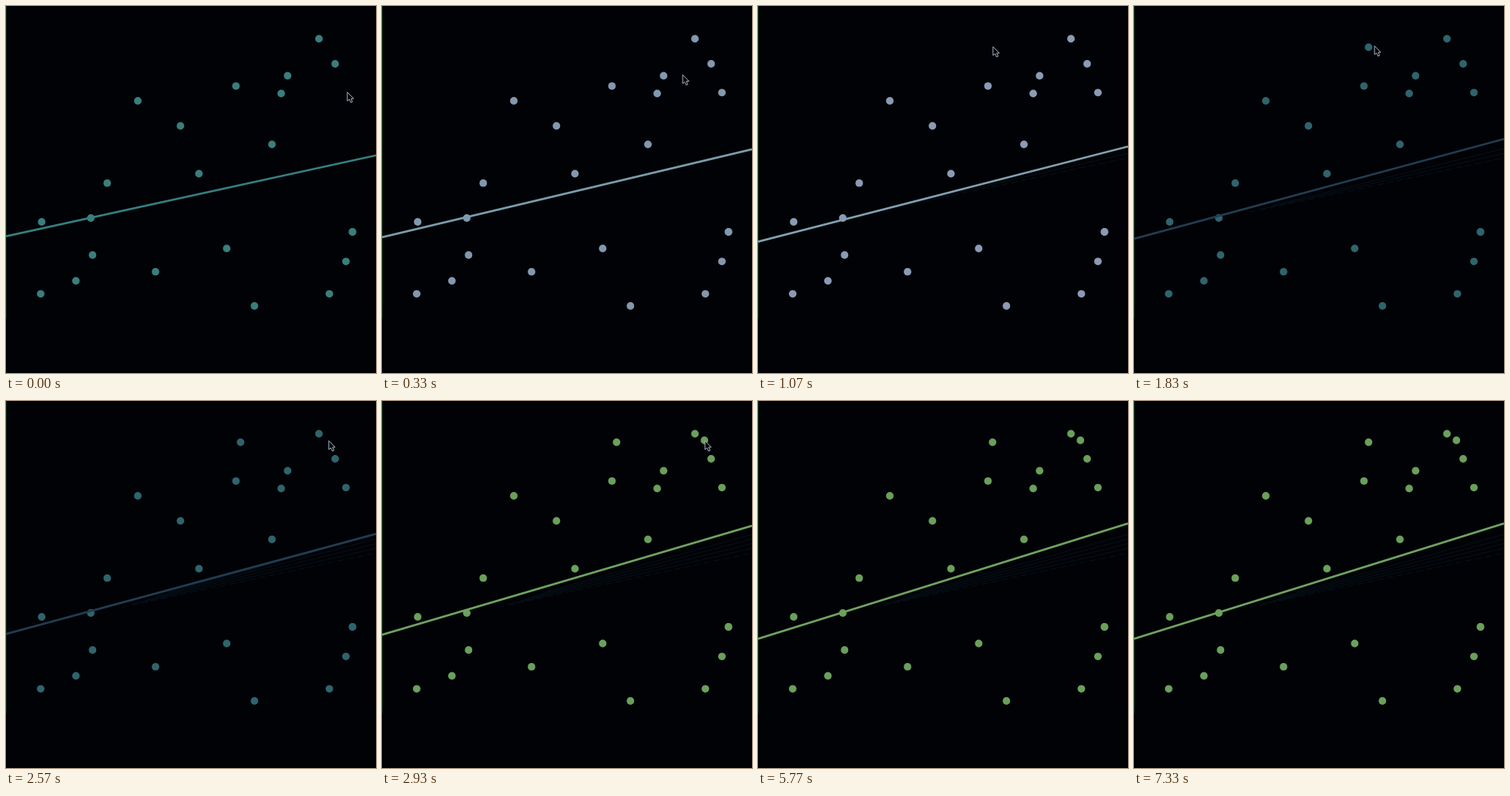
Write an HTML page that moves like this. It is 480 px wide and 476 px high and loops after 7410 ms.

```html
<!DOCTYPE html>
<html lang="en">
<head>
<meta charset="utf-8">
<title>Line fitting</title>
<style>
  html, body { margin: 0; width: 100%; height: 100%; overflow: hidden; background: #010206; }
  svg { display: block; width: 100vw; height: 100vh; }
</style>
</head>
<body>
<svg viewBox="0 0 480 476">
  <rect width="480" height="476" fill="#010206"/>
  <rect width="1" height="405" fill="#08260f"/>
  <g id="trails" stroke="#04121a"></g>
  <g id="dots"></g>
  <line id="fit" x1="0" x2="480" stroke-width="2.7"/>
  <path id="cursor" d="M0 0V11.4L2.6 9.2L4.6 13.4L6.6 12.5L4.8 8.4H8.2Z"
        fill="#010206" stroke="#a9b6c6"/>
</svg>
<script>
const LOOP = 7410, WIDTH = 480, STEP = 24, RATE = 0.5;
const $ = id => document.getElementById(id);

function set(el, attrs) {
  for (const k in attrs) el.setAttribute(k, attrs[k]);
  return el;
}
const add = (parent, tag, attrs) =>
  set(parent.appendChild(document.createElementNS('http://www.w3.org/2000/svg', tag)), attrs);

// The last point was placed twice, so it counts double in the fit.
const points = [
  [406, 42.5], [427, 75], [365.3, 90.5], [357, 113.5], [298.3, 103.8],
  [171, 123], [226.3, 155.5], [345, 179.5], [250.3, 217.5], [131.3, 229.7],
  [46.3, 280], [110, 275], [112.3, 323], [90.7, 356.5], [45, 373.3],
  [194, 344.7], [286.3, 314.5], [322.3, 389], [419.5, 373.3], [441, 331.3],
  [449.5, 293], [449.5, 293]
].map(([x, y]) => ({ x, y, at: 0 }));

// Each click adds a point and brings a new tint for the dots and the line.
const clicks = [
  { x: 441, y: 112.3, at: 110, dot: [139, 155, 180], line: [130, 161, 177] },
  { x: 304.3, y: 53.5, at: 1100, dot: [47, 100, 108], line: [33, 61, 82] },
  { x: 418.3, y: 51, at: 2630, dot: [106, 160, 91], line: [110, 163, 96] }
];
const firstTint = { dot: [58, 126, 124], line: [54, 127, 128] };
const TINT_TIME = 280;

const cursorStart = [442.8, 111.8];
const cursorMoves = [
  { from: 150, to: 580, end: [304.9, 52.7] },
  { from: 1550, to: 1800, end: [312, 51.7] },
  { from: 2200, to: 2580, end: [419, 51.6] },
  { from: 2960, to: 3350, end: [488, 112] }
];

const data = [...points, ...clicks];
const dots = data.map(({ x, y, at }) => ({ at, el: add($('dots'), 'circle', { cx: x, cy: y, r: 4.9 }) }));

// Faint traces of earlier lines, fanning out from one pivot.
const trails = Array.from({ length: 5 }, (_, i) => {
  const right = 197 - 6 * i, x = 150 + 15 * i;
  const y = 276 + (right - 276) * (x - 110) / (WIDTH - 110);
  const el = add($('trails'), 'line', { x1: x, y1: y, x2: WIDTH, y2: right });
  if (!i) set(el, { 'stroke-dasharray': '9 4' });
  return { at: 500 + 500 * i, el };
});

// Gradient descent on the squared error, one step every STEP ms.
function descend() {
  let slope = -105, base = 298.7;
  const history = [];
  for (let t = 0; t <= LOOP; t += STEP) {
    history.push([base, base + slope]);
    const seen = data.filter(p => p.at <= t);
    let dSlope = 0, dBase = 0;
    for (const p of seen) {
      const u = p.x / WIDTH, error = base + slope * u - p.y;
      dSlope += error * u;
      dBase += error;
    }
    // The starting line holds until the first click.
    if (t < clicks[0].at) continue;
    slope -= 2 * RATE * dSlope / seen.length;
    base -= 2 * RATE * dBase / seen.length;
  }
  return history;
}
const lines = descend();

function ease(t, from, to) {
  const u = Math.min(1, Math.max(0, (t - from) / (to - from)));
  return u * u * (3 - 2 * u);
}
const mix = (a, b, u) => a.map((v, i) => v + (b[i] - v) * u);

const tint = (key, t) => `rgb(${clicks.reduce(
  (c, k) => mix(c, k[key], ease(t, k.at, k.at + TINT_TIME)), firstTint[key]).map(Math.round)})`;

const cursorAt = t => cursorMoves.reduce(
  (p, m) => mix(p, m.end, ease(t, m.from, m.to)), cursorStart);

function draw(t) {
  const [y1, y2] = lines[Math.floor(t / STEP)];
  set($('fit'), { y1, y2, stroke: tint('line', t) });
  set($('dots'), { fill: tint('dot', t) });
  set($('cursor'), { transform: `translate(${cursorAt(t)})` });
  for (const { at, el } of [...dots, ...trails]) {
    set(el, { visibility: t >= at ? 'visible' : 'hidden' });
  }
}

const start = performance.now();
function tick() {
  draw((performance.now() - start) % LOOP);
  requestAnimationFrame(tick);
}
tick();
</script>
</body>
</html>
```
